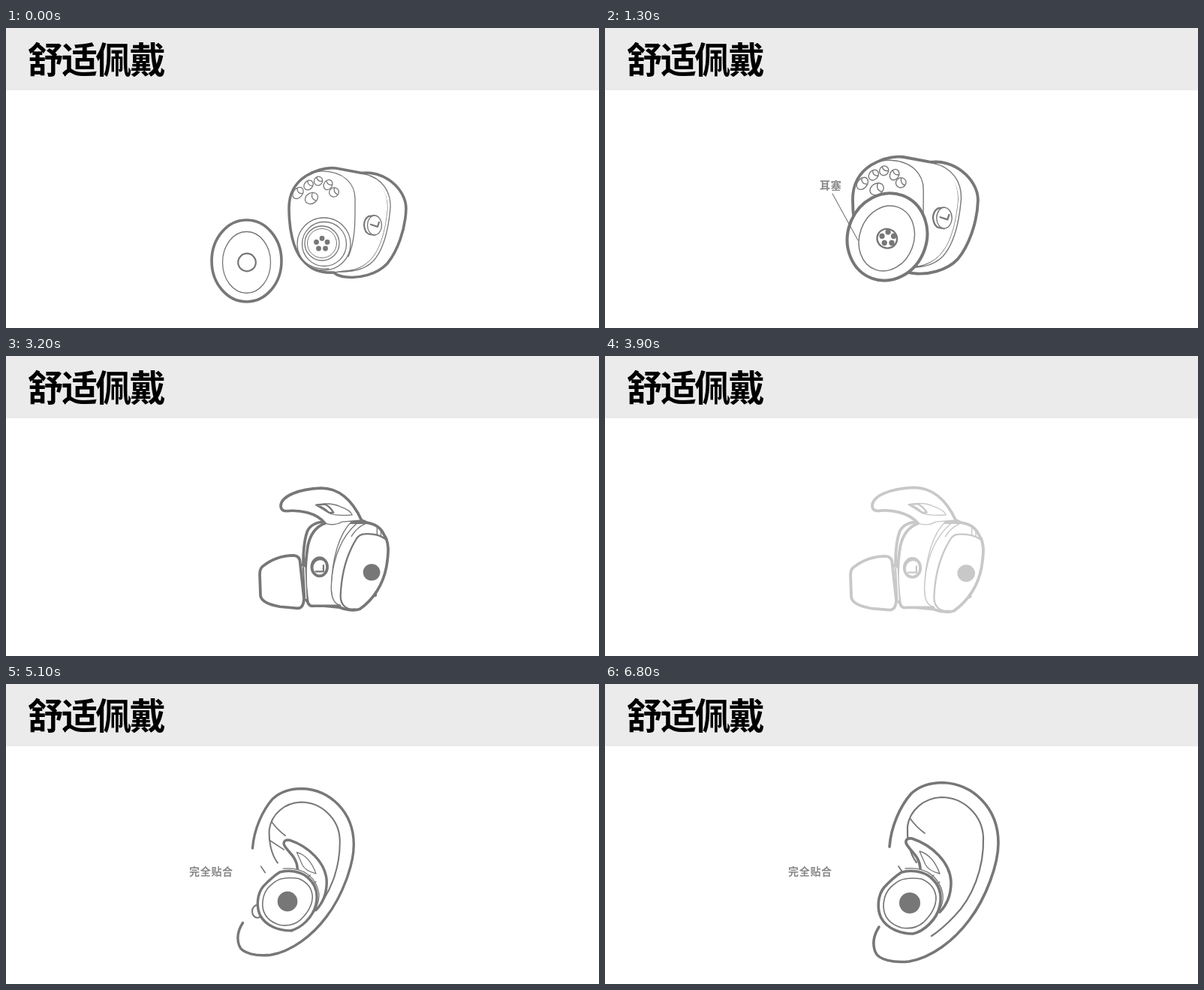
Write an HTML page that moves like this. It is 790 by 400 pixels and loops after 6900 ms.

```html
<!DOCTYPE html>
<html lang="zh-CN">
<head>
<meta charset="utf-8">
<style>
  html, body { margin: 0; width: 100%; height: 100%; overflow: hidden; background: #fff; }
  svg { display: block; }
  text { font-family: "Noto Sans CJK SC", "Noto Sans CJK", sans-serif; font-weight: 700; }
  .art { fill: none; stroke: #777; stroke-width: 1.3; stroke-linecap: round; stroke-linejoin: round; }
  .art .w { fill: #fff; }
  .bare { fill: #fff; stroke: none; }
  .b { stroke-width: 3.6; }
  .m { stroke-width: 2.2; }
  .dot { fill: #777; stroke: none; }
  .label { font-size: 14px; letter-spacing: .7px; fill: #888; stroke: none; }
</style>
</head>
<body>
<svg width="790" height="400" viewBox="0 0 790 400">
  <rect width="790" height="83" fill="#ebebeb"/>
  <text x="28.5" y="60" font-size="48" letter-spacing="-2.6">舒适佩戴</text>

  <!-- bud and ear tip -->
  <g id="first" class="art">
    <g id="budA">
      <path class="w b" d="M472 194C502 188 533 214 533 241C532 270 521 298 508 314C494 329 470 334 453 332Q443 331 438 327"/>
      <path d="M478 195C501 200 513 218 512 240C509 274 501 298 489 311C477 323 460 326 436 325M472 194C497 202 508 219 508 240C505 274 497 296 486 308C476 319 462 324 448 324"/>
      <path class="w" d="M440 187L472 194L480 196C500 204 508 219 508 240C505 274 497 296 486 308C476 319 462 324 435 326" stroke="none"/>
      <path class="b" d="M480 194L472 193L440 187C425 185 412 190 400 197C383 208 377 222 377 240C377 270 383 295 394 308C405 322 418 327 437 326"/>
      <path d="M437 326Q448 324 462 323M418 191C450 190 466 208 465 230C465 255 466 282 456 305M385 213Q398 192 420 191"/>
      <g id="holes"></g>
      <ellipse class="w" cx="423.5" cy="288" rx="35.5" ry="35"/>
      <path d="M390 300C397 317 412 322 430 321"/>
      <circle cx="424" cy="288" r="29.5"/>
      <circle cx="421" cy="287" r="23"/>
      <circle cx="421" cy="287" r="19.5" stroke-width="1"/>
      <g id="dots"></g>
      <path class="w m" d="M491 250L483 251Q477 255 477 263Q478 273 484 275L491 276"/>
      <ellipse class="w" cx="491" cy="263" rx="9.5" ry="13"/>
      <path class="m" d="M486 262L495 265L497 259"/>
    </g>
    <g id="tipA">
      <path class="bare" fill-rule="evenodd" d="M-46.5 0a46.5 54.5 0 1 0 93 0a46.5 54.5 0 1 0-93 0M-11.5 2a12 12 0 1 0 24 0a12 12 0 1 0-24 0"/>
      <ellipse class="b" rx="46.5" ry="54.5" stroke-width="4"/>
      <ellipse cy="2" rx="32" ry="41"/>
      <circle class="m" cx=".5" cy="2" r="11.8" stroke-width="1.8"/>
    </g>
    <g id="noteA">
      <text class="label" x="286" y="214.5">耳塞</text>
      <path d="M303 221L337 283" stroke-width="1.1"/>
    </g>
  </g>

  <!-- bud and fin ring -->
  <g id="second" class="art">
    <g id="budB">
      <g class="ring">
        <path class="w b" d="M352 339Q368 338 374 332L398 325V255Q397 232 380 227L368 228"/>
        <text transform="translate(370.5 279) rotate(-84)" font-size="17" letter-spacing="1.5" style="font-family:Roboto,sans-serif;font-weight:400;fill:#777;stroke:none">EFT</text>
      </g>
      <path class="w b" d="M405 275C405 255 407 243 410 234Q415 222 432 221L470 222L486 222Q503 224 509 238C516 248 515 262 512 280C508 302 496 322 478 335Q468 339 452 333L422 330Q409 328 408 320Z"/>
      <path d="M438 222C420 232 414 255 412 285Q411 312 413 325M474 223C455 240 444 265 441 300Q440 325 450 332M486 223Q474 228 467 240M500 229V239M505 231V240"/>
      <path class="m" stroke-width="1.8" d="M510 243Q500 236 484 237Q477 237 473 244C461 264 454 290 453 318C453 330 461 337 472 335"/>
      <ellipse class="m" cx="427" cy="282" rx="10.5" ry="12"/>
      <path class="m" d="M421 286H431V278"/>
      <circle class="dot" cx="493" cy="287" r="11"/>
      <g class="ring">
        <path class="bare" fill-rule="evenodd" d="M281 215C300 213 320 216 333 231C320 236 314 246 311 260C307 285 307 310 310 330Q311 340 318 339L352 339Q341 335 341 315C342 280 350 245 368 228L380 227C368 200 350 185 328 185C300 186 277 195 276 208Q276 214 281 215ZM316 288a10 12 0 1 0 20 0a10 12 0 1 0-20 0"/>
        <path class="b" d="M380 227C368 200 350 185 328 185C300 186 277 195 276 208Q276 215 283 215C300 213 322 217 333 231C320 236 314 246 311 260C307 285 307 310 310 330Q311 340 318 339L352 339"/>
        <path d="M352 338Q341 335 341 315C342 280 350 245 368 228M333 231Q345 235 355 229L380 227M321 207Q340 203 352 209Q366 214 368 220Q345 222 337 217Z"/>
        <path class="m" d="M322 207L333 206Q340 210 344 217L338 217Q331 210 322 207Z"/>
        <ellipse class="b" stroke-width="3" cx="326" cy="288" rx="10" ry="12"/>
      </g>
      <path class="w" d="M399 277L408 280L410 322L403 324Z"/>
      <path class="m" d="M400 276L408 279M402 319L410 324M405 281L407 320"/>
      <path class="w b" d="M352 280C365 269 380 265 393 265Q401 266 401 275L406 322Q405 334 398 334L375 332Q352 328 350 318L349 290Q349 283 352 280Z"/>
    </g>
  </g>

  <!-- bud worn in the ear -->
  <g id="third" class="art">
    <g id="ear">
      <path class="b" d="M379 217C381 190 393 163 408 146C420 135 435 131.500 450 131.500C490 133 524 165 524 212C524 240 508 285 485 315C465 342 435 365 405 370C385 372 364 368 360 357Q354 341 365 324"/>
      <path class="m" stroke-width="2" d="M415 238C405 225 402 205 403 190C406 168 425 152 448 151C478 151 503 175 504 205C505 245 490 285 465 310Q450 326 435 336"/>
      <path stroke-width="1.8" d="M407 180Q415 191 426 199M404 206L424 219M391 243L397 252"/>
    </g>
    <g id="budC">
      <ellipse id="tipC" class="w m" cx="364" cy="306" rx="7.500" ry="9"/>
      <path class="w b" stroke-width="3" d="M420 246C419 228 405 222 401 212Q400 205 409 206C436 215 460 238 461 264C461 284 454 296 446 304"/>
      <path d="M419 223Q437 228 446 253Q431 249 427 241ZM400 246C428 243 446 258 450 280Q452 296 438 312M430 262L438 255M437 270L446 264"/>
      <path class="w b" d="M395 251C408 247 425 250 434 258C446 268 449 282 446 296C442 314 425 330 410 333C395 333 376 327 368 312C362 300 363 282 372 271Q384 258 395 251Z"/>
      <path stroke-width="1.700" d="M399 260Q410 258 422 260Q440 268 441 285Q441 302 424 318Q412 328 395 325Q372 318 371 297Q371 278 384 268Q392 261 399 260Z"/>
      <circle class="dot" cx="406" cy="292" r="14"/>
    </g>
    <text class="label" x="244" y="255">完全贴合</text>
  </g>
</svg>
<script>
const LOOP = 6900, STEP = 100;
const $ = id => document.getElementById(id);
const move = (el, value) => el.setAttribute("transform", value);
const fade = (el, value) => el.setAttribute("opacity", value);

// Linear interpolation through [time, value] pairs.
function key(t, ...keys) {
  if (t <= keys[0][0]) return keys[0][1];
  for (let i = 1; i < keys.length; i++) {
    const [t0, v0] = keys[i - 1], [t1, v1] = keys[i];
    if (t <= t1) return v0 + (v1 - v0) * (t - t0) / (t1 - t0);
  }
  return keys[keys.length - 1][1];
}

// Vents: x, y, rx, ry, angle
$("holes").innerHTML = [
  [389, 220, 8.5, 6, -50], [403, 209.5, 7, 5.5, -50], [416, 204, 6, 5.5, -60],
  [429, 209, 7, 5.5, -60], [437, 219, 6.5, 6, -30], [407, 227, 9, 7, -30]
].map(([x, y, rx, ry, a]) => `<g transform="translate(${x} ${y}) rotate(${a})">
  <ellipse rx="${rx}" ry="${ry}"/><path d="M${rx * .5} ${-ry * .8}Q${-rx * .2} 0 ${rx * .4} ${ry * .85}"/></g>`).join("");
$("dots").innerHTML = [[421, 280.5], [413.5, 285.5], [428, 285.5], [416.5, 294], [425.5, 294]]
  .map(([x, y]) => `<circle class="dot" cx="${x}" cy="${y}" r="3.4"/>`).join("");

function drawFirst(t) {
  const u = t / 1300, s = 1 + .07 * u;
  move($("budA"), `translate(${377 - 47 * u} ${187 - 15 * u}) scale(${s}) translate(-377 -187)`);
  const x = key(t, [0, 320.5], [700, 333], [1300, 376]);
  const y = key(t, [0, 310.5], [700, 303], [1300, 278.5]);
  const v = Math.min(u, 1);
  move($("tipA"), `translate(${x} ${y}) rotate(${20 * v}) scale(${1 + .13 * v} ${1 + .08 * v})`);
  move($("noteA"), `translate(${x - 376} ${y - 278.5})`);
  fade($("noteA"), key(t, [500, 0], [700, 1]));
  fade($("first"), key(t, [1400, 1], [1600, 0]));
}

function drawSecond(t) {
  const u = key(t, [2500, 0], [3900, 1]);
  move($("budB"), `translate(${405 - 18 * u} 219) scale(${1 + .07 * u} ${1 + .04 * u}) translate(-405 -219)`);
  const k = key(t, [1600, -.42], [2100, -.39], [2500, 0], [2900, 1]);
  document.querySelectorAll(".ring").forEach(r => move(r, `translate(${100 * k} ${-8 * k})`));
  fade($("second"), key(t, [1500, 0], [1700, 1], [3750, 1], [4000, 0]));
}

function drawThird(t) {
  const left = key(t, [4000, 276], [4200, 282], [4900, 304], [5100, 308], [5600, 325], [5900, 334], [6300, 346], [6800, 357]);
  const top = key(t, [4000, 139], [5100, 139], [5900, 134], [6800, 131]);
  const s = key(t, [4000, .925], [5100, .93], [5900, .97], [6800, 1]);
  move($("ear"), `translate(${left} ${top}) scale(${s}) translate(-357 -131)`);
  const x = key(t, [4200, 412], [4600, 399], [5100, 375], [5500, 377], [5900, 384.5], [6800, 406]);
  const y = key(t, [5100, 288], [5900, 290]);
  const b = key(t, [4200, .92], [5100, .95], [5700, 1]);
  move($("budC"), `translate(${x} ${y}) scale(${b}) translate(-406 -290)`);
  fade($("tipC"), key(t, [5100, 1], [5500, 0]));
  fade($("third"), key(t, [3900, 0], [4200, 1]));
}

function frame() {
  const t = Math.floor(performance.now() % LOOP / STEP) * STEP;
  drawFirst(t);
  drawSecond(t);
  drawThird(t);
  requestAnimationFrame(frame);
}
frame();
</script>
</body>
</html>
```
